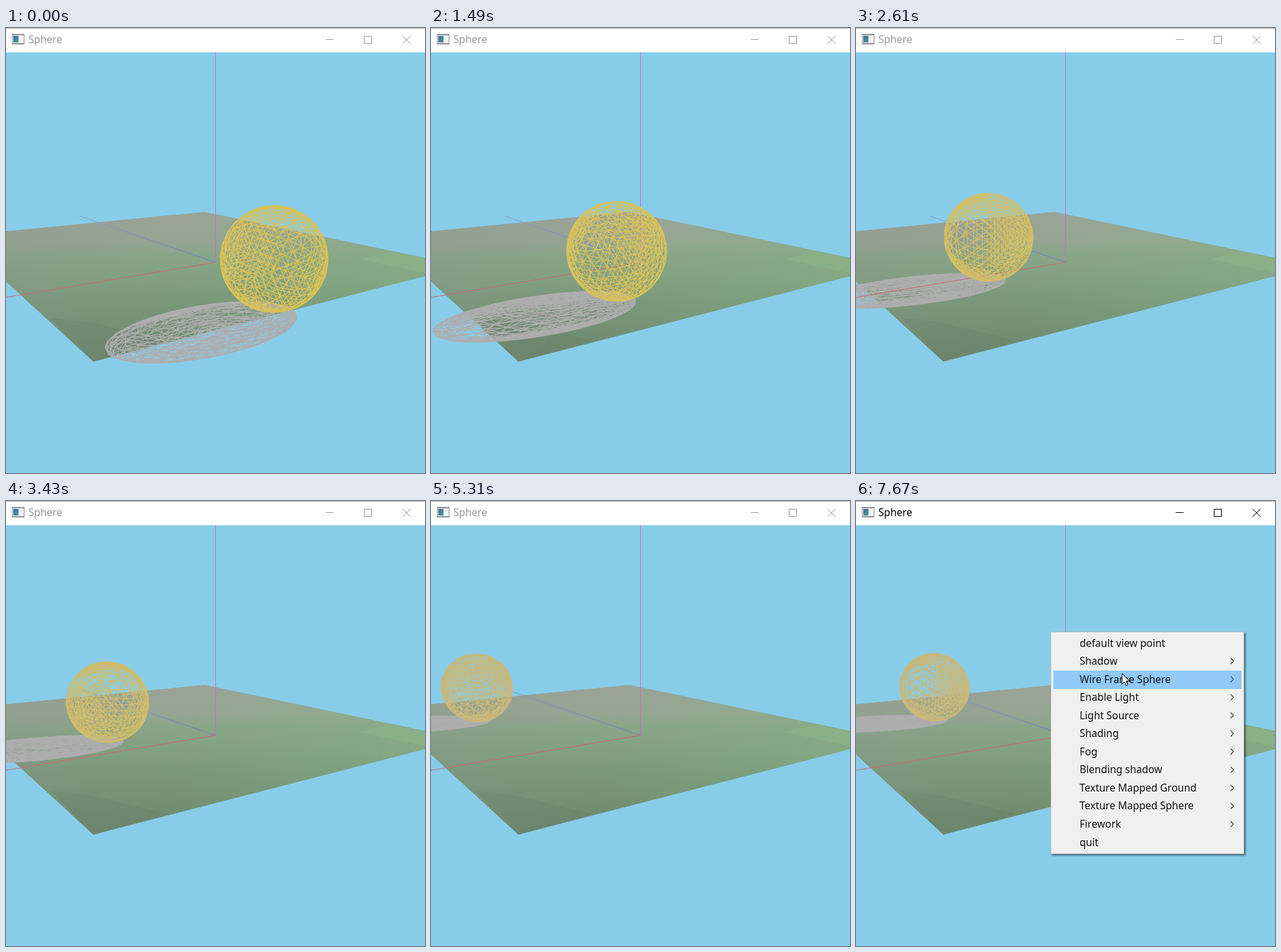
These frames come from a looping animation (637 px wide and 677 px high, 8 s). An HTML page with a canvas:

```html
<!DOCTYPE html>
<html lang="en">
<head>
<meta charset="utf-8">
<title>Sphere</title>
<style>
html, body { margin: 0; width: 100%; height: 100%; overflow: hidden; background: #87cdea; }
canvas { display: block; }
</style>
</head>
<body>
<canvas id="stage" width="637" height="677"></canvas>
<script>
const ctx = document.getElementById('stage').getContext('2d');
const W = 637, H = 677, BAR = 37, LOOP = 8000;
const MENU_TIME = 6850, HOVER_TIME = 7170;
const FONT = '"Noto Sans", "Open Sans", sans-serif';

// Keyframes: time, then values interpolated linearly.
const ROLL = [[0, 1.3, -3.75], [493, 2, -4], [5789, 3, 5], [6740, 2.22, 3.83], [6870, 2.09, 3.74]];
const POINTER = [[6000, 600, 677], [6560, 296, 203], [6650, 296, 199], [HOVER_TIME, 296, 199], [7670, 404, 262]];
const MENU = ['default view point', 'Shadow', 'Wire Frame Sphere', 'Enable Light', 'Light Source', 'Shading',
  'Fog', 'Blending shadow', 'Texture Mapped Ground', 'Texture Mapped Sphere', 'Firework', 'quit'];
const ROW = 27.55;

function sample(keys, t) {
  if (t <= keys[0][0]) return keys[0].slice(1);
  for (let i = 1; i < keys.length; i++) {
    const [a, b] = [keys[i - 1], keys[i]];
    if (t < b[0]) {
      const k = (t - a[0]) / (b[0] - a[0]);
      return a.slice(1).map((v, j) => v + (b[j + 1] - v) * k);
    }
  }
  return keys[keys.length - 1].slice(1);
}

// Vector helpers and a camera looking at the world's centre.
const dot = (a, b) => a[0] * b[0] + a[1] * b[1] + a[2] * b[2];
const cross = (a, b) => [a[1] * b[2] - a[2] * b[1], a[2] * b[0] - a[0] * b[2], a[0] * b[1] - a[1] * b[0]];
const unit = a => { const n = Math.hypot(...a); return a.map(v => v / n); };
const EYE = [7, 3, -10].map(v => v * 1.0711);
const LIGHT = [-14, 12, -3];
const FOCAL = 320 / Math.tan(Math.PI / 8);
const forward = unit(EYE.map(v => -v));
const right = unit(cross(forward, [0, 1, 0]));
const up = cross(right, forward);
const distance = Math.hypot(...EYE);

function project(p) {
  const scale = FOCAL / (distance + dot(forward, p));
  return [318.5 + dot(right, p) * scale, 356.5 - dot(up, p) * scale];
}

function castShadow(p) {
  const s = LIGHT[1] / (LIGHT[1] - p[1]);
  return [LIGHT[0] + (p[0] - LIGHT[0]) * s, 0, LIGHT[2] + (p[2] - LIGHT[2]) * s];
}

// A tetrahedron split four times onto the unit sphere: 1024 faces.
function buildSphere(levels) {
  const points = [[0, 0, 1], [0, 0.943, -0.333], [-0.816, -0.471, -0.333], [0.816, -0.471, -0.333]].map(unit);
  let faces = [[0, 1, 2], [0, 2, 3], [0, 3, 1], [1, 3, 2]];
  const key = (a, b) => Math.min(a, b) * 4096 + Math.max(a, b);
  const mids = new Map();
  const middle = (a, b) => {
    const k = key(a, b);
    if (!mids.has(k)) mids.set(k, points.push(unit(points[a].map((v, i) => v + points[b][i]))) - 1);
    return mids.get(k);
  };
  while (levels--) {
    faces = faces.flatMap(([a, b, c]) => {
      const ab = middle(a, b), bc = middle(b, c), ca = middle(c, a);
      return [[a, ab, ca], [b, bc, ab], [c, ca, bc], [ab, bc, ca]];
    });
  }
  const edges = new Map();
  for (const [a, b, c] of faces)
    for (const [m, n] of [[a, b], [b, c], [c, a]]) edges.set(key(m, n), [m, n]);
  return { points, edges: [...edges.values()] };
}
const sphere = buildSphere(4);

function rotate(p, axis, angle) {
  const c = Math.cos(angle), s = Math.sin(angle), q = cross(axis, p), d = dot(axis, p) * (1 - c);
  return p.map((v, i) => v * c + q[i] * s + axis[i] * d);
}

// Ball points in the world, rolled without slipping along the path up to time t.
function rolledPoints(t) {
  const [x, z] = sample(ROLL, t);
  let points = sphere.points;
  for (let i = 1; i < ROLL.length && ROLL[i - 1][0] < t; i++) {
    const [, x0, z0] = ROLL[i - 1];
    const [x1, z1] = sample(ROLL, Math.min(t, ROLL[i][0]));
    const length = Math.hypot(x1 - x0, z1 - z0);
    if (!length) continue;
    const axis = [(z1 - z0) / length, 0, (x0 - x1) / length];
    points = points.map(p => rotate(p, axis, length));
  }
  return points.map(p => [p[0] + x, p[1] + 1, p[2] + z]);
}

function polygon(points, fill) {
  ctx.beginPath();
  points.forEach(p => ctx.lineTo(...p));
  ctx.closePath();
  ctx.fillStyle = fill;
  ctx.fill();
}

function lines(segments, color, width = 1) {
  ctx.beginPath();
  for (const [a, b] of segments) {
    ctx.moveTo(...a);
    ctx.lineTo(...b);
  }
  ctx.strokeStyle = color;
  ctx.lineWidth = width;
  ctx.stroke();
}

function wire(points, color, width) {
  const flat = points.map(project);
  lines(sphere.edges.map(([a, b]) => [flat[a], flat[b]]), color, width);
}

function gradient(x0, y0, x1, y1, ...stops) {
  const g = ctx.createLinearGradient(x0, y0, x1, y1);
  stops.forEach(([at, color]) => g.addColorStop(at, color));
  return g;
}

function drawGround() {
  const ground = [[5, 0, -4], [5, 0, 8], [-5, 0, 8], [-5, 0, -4]].map(project);
  polygon(ground, gradient(0, 280, 0, 508,
    [0, '#9ba398'], [0.2, '#94a592'], [0.28, '#89a588'], [0.46, '#819f80'], [0.56, '#7a987a'], [1, '#6b866c']));
  polygon(ground, gradient(250, 0, 660, 0, [0, 'rgba(136,176,134,0)'], [1, 'rgba(136,176,134,.55)']));
  polygon(ground, gradient(0, 0, 240, 0, [0, 'rgba(140,148,140,.3)'], [1, 'rgba(140,148,140,0)']));
  polygon([[68, 441], [130, 448], [245, 476], [133, 508]], 'rgba(95,115,98,.2)');
  polygon([[540, 352], [583, 340], [637, 351], [637, 373]], 'rgba(140,180,136,.65)');
}

function drawScene(t) {
  ctx.fillStyle = '#87cdea';
  ctx.fillRect(0, 0, W, H);
  drawGround();

  const ball = rolledPoints(t);
  wire(ball.map(castShadow), '#aeadae', 1.15);

  const center = project([0, 0, 0]);
  const zEnd = project([0, 0, 10]);
  lines([[center, project([10, 0, 0])]], '#d0686c');
  lines([[center, zEnd]], gradient(...center, ...zEnd, [0, '#7379cc'], [1, '#8d9bc0']));
  lines([[center, project([0, 10, 0])]], '#cc6bd0');

  const [x, z] = sample(ROLL, t);
  const fog = Math.min(1, Math.max(0, (distance + dot(forward, [x, 1, z]) - 9.4) / 6));
  const mix = (a, b) => Math.round(a + (b - a) * fog);
  wire(ball, `rgb(${mix(218, 200)},${mix(194, 183)},${mix(86, 124)})`, 1.1);
}

function drawTitleBar(active) {
  const ink = active ? '#000' : '#999';
  ctx.fillStyle = '#fff';
  ctx.fillRect(0, 0, W, BAR);
  ctx.fillStyle = '#aaa';
  ctx.fillRect(0, 0, W, 1);

  ctx.fillStyle = '#8b9196';
  ctx.fillRect(9, 9, 19, 16);
  ctx.fillStyle = '#f1f3f4';
  ctx.fillRect(10, 11, 17, 12);
  ctx.fillStyle = gradient(11, 12, 19, 22, [0, '#3b6fa5'], [1, '#4c9a82']);
  ctx.fillRect(11, 12, 8, 10);

  ctx.fillStyle = ink;
  ctx.font = `15.6px ${FONT}`;
  ctx.fillText('Sphere', 34, 23);
  lines([[[486, 17.5], [498, 17.5]], [[603, 12], [615, 24]], [[615, 12], [603, 24]]], ink);
  ctx.strokeRect(544.5, 12.5, 11, 11);
}

function drawMenu(alpha, hovered) {
  ctx.save();
  ctx.globalAlpha = alpha;
  ctx.save();
  ctx.shadowColor = 'rgba(0,0,0,.55)';
  ctx.shadowBlur = 3;
  ctx.shadowOffsetX = ctx.shadowOffsetY = 2;
  ctx.fillStyle = '#f0f0f0';
  ctx.fillRect(296, 199, 294, 338);
  ctx.restore();
  ctx.strokeStyle = '#ccc';
  ctx.lineWidth = 1;
  ctx.strokeRect(296.5, 199.5, 293, 337);

  ctx.font = `15.5px ${FONT}`;
  MENU.forEach((label, i) => {
    const y = 216 + i * ROW;
    if (i === hovered) {
      ctx.fillStyle = '#91c9f7';
      ctx.fillRect(300, Math.round(y - 13.5), 286, 28);
    }
    ctx.fillStyle = '#111';
    ctx.fillText(label, 340, Math.round(y + 5.5));
    if (i > 0 && i < MENU.length - 1)
      lines([[[569.5, y - 4.5], [574, y]], [[574, y], [569.5, y + 4.5]]], '#444', 1.3);
  });
  ctx.restore();
}

function drawPointer(x, y) {
  ctx.save();
  ctx.translate(x + 0.5, y + 0.5);
  polygon([[0, 0], [0, 16], [3.7, 12.5], [6.2, 18.3], [8.7, 17.2], [6.2, 11.5], [11.3, 11.5]], '#fff');
  ctx.strokeStyle = '#000';
  ctx.lineWidth = 1;
  ctx.stroke();
  ctx.restore();
}

function draw(t) {
  const [x, y] = sample(POINTER, t);
  drawScene(t);
  drawTitleBar(t >= MENU_TIME);
  if (t >= MENU_TIME) {
    const hovered = t > HOVER_TIME && x >= 300 ? Math.floor((y - 202) / ROW) : -1;
    drawMenu(Math.min(1, (t - MENU_TIME + 30) / 150), hovered);
  }
  if (t > POINTER[0][0]) drawPointer(x, y);
}

const start = performance.now();
function frame() {
  draw((performance.now() - start) % LOOP);
  requestAnimationFrame(frame);
}
frame();
</script>
</body>
</html>
```
